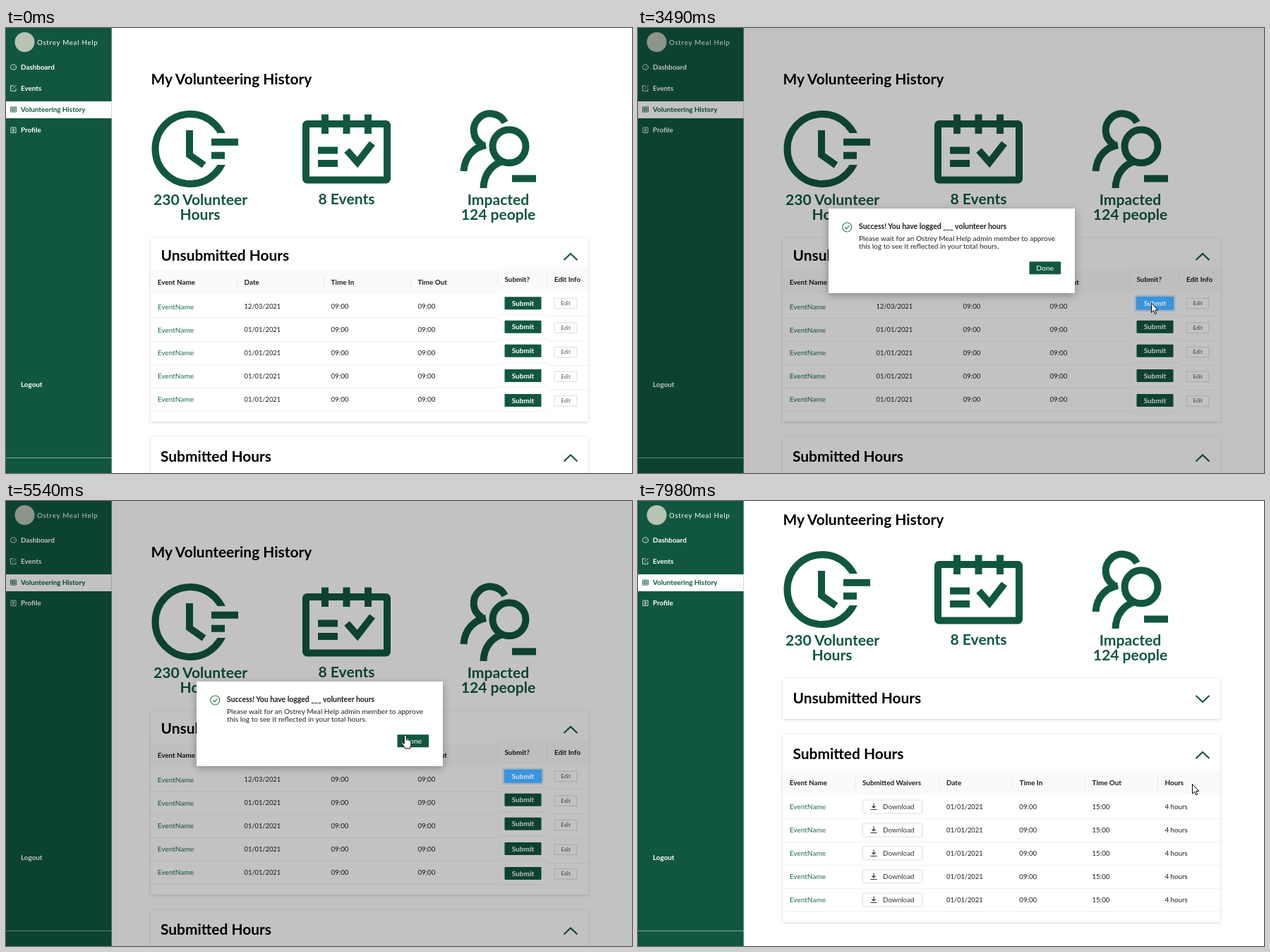
Animation, 887 px wide and 631 px high, one loop 8000 ms. Source, as an HTML page:

```html
<!DOCTYPE html>
<html lang="en">
<head>
<meta charset="utf-8">
<title>Volunteering history</title>
<style>
  html, body { margin: 0; width: 100%; height: 100%; overflow: hidden; background: #fff; }
  svg { display: block; width: 887px; height: 631px; font-family: Lato, "Open Sans", sans-serif; }
  .card { fill: #fff; filter: drop-shadow(0 1px 2px rgba(0,0,0,.17)); }
  .modal { fill: #fff; filter: drop-shadow(0 3px 6px rgba(0,0,0,.3)); }
  .line { fill: none; stroke: #115740; stroke-width: 10; }
</style>
</head>
<body>
<svg id="stage" viewBox="0 0 887 631"></svg>
<script>
const GREEN = '#115740', BLUE = '#40a9ff', LINK = '#1f6b4f', INK = '#1c1c1c';
const LOOP = 8000, SCROLL = 46;
const rows = [0, 1, 2, 3, 4];
const each = fn => rows.map(fn).join('');

// Text is placed by the middle of its capitals.
const text = (x, mid, str, { size = 9.9, fill = INK, weight = 400, anchor = 'start', gap = 0 } = {}) =>
  `<text x="${x}" y="${mid + size * .36}" font-size="${size}" fill="${fill}" font-weight="${weight}"
    text-anchor="${anchor}" letter-spacing="${gap}">${str}</text>`;
const bold = (x, mid, str, opt) => text(x, mid, str, { weight: 700, ...opt });
const head = (x, mid, str) => bold(x, mid, str, { size: 20.9, fill: '#000' });
const stat = (x, mid, str) => bold(x, mid, str, { size: 21.1, fill: GREEN, anchor: 'middle' });
const rect = (x, y, w, h, fill, more = '') =>
  `<rect x="${x}" y="${y}" width="${w}" height="${h}" fill="${fill}" ${more}/>`;
const card = (y, h) => `<rect class="card" x="205" y="${y}" width="620" height="${h}" rx="1"/>`;
const rule = (x, y, w) => rect(x, y, w, 1, '#f0f0f0');
const tick = (x, y) => rect(x, y, 1, 16, '#e8e8e8');
const chevron = (y, up) =>
  `<path d="M790.5 ${up ? y + 5 : y - 5}L800 ${up ? y - 4 : y + 4}L809.5 ${up ? y + 5 : y - 5}"
    fill="none" stroke="${GREEN}" stroke-width="2.2"/>`;
const button = (y, fill) => rect(706.5, y, 52, 18, fill, 'rx="1"') +
  bold(732.5, y + 9, 'Submit', { size: 10.1, fill: '#fff', anchor: 'middle' });
const edit = (y, edge, ink) => rect(777, y, 32, 14.5, '#fff', `stroke="${edge}"`) +
  text(793, y + 7, 'Edit', { size: 7.8, fill: ink, anchor: 'middle' });

const summary = head(205.5, 72, 'My Volunteering History') + `
  <g class="line">
    <circle cx="261" cy="171.5" r="49.5"/>
    ${rect(286, 149, 44, 45, '#fff', 'stroke="none"')}
    <path d="M260 145V180L280.5 194.5M291 161.8H329M291 180.8H310"/>
    <rect x="425" y="136" width="115" height="79.5" rx="1.5"/>
    <path d="M452 122.5V150M482.5 122.5V150M513 122.5V150M442 173.5H470M442 192H470M483 173.5L498 190.5L519 163.5"/>
    <circle cx="713" cy="167.8" r="23.5"/>
    <path d="M707 134A23.5 23.5 0 1 0 674 165"/>
    <path d="M648.5 203C650 181 664 169 680 166M676.5 227C677 206 690 193 704 189M717 213.5H751"/>
  </g>` +
  stat(275.5, 243, '230 Volunteer') + stat(275, 264.5, 'Hours') +
  stat(482.5, 242.5, '8 Events') + stat(697.5, 243, 'Impacted') + stat(697.5, 264.5, '124 people');

const openHours = card(298, 260) + head(219.5, 322, 'Unsubmitted Hours') + chevron(324, true) +
  rect(205, 344, 492, 33, '#fafafa') + rect(697, 339, 128, 35, '#fafafa') +
  ['Event Name', 'Date', 'Time In', 'Time Out'].map((s, i) =>
    bold(214.7 + i * 122.9, 360.5, s) + (i ? tick(204 + i * 123, 353) : '')).join('') +
  tick(696, 348) + tick(766, 348) + bold(706.5, 356, 'Submit?') + bold(777, 356, 'Edit Info') +
  each(i => {
    const y = 395 + i * 32.9;
    return text(214.7, y, 'EventName', { size: 10.1, fill: LINK }) +
      text(337.6, y, i ? '01/01/2021' : '12/03/2021', { size: 9.3 }) +
      text(460.5, y, '09:00', { size: 9.7 }) + text(583.4, y, '09:00', { size: 9.7 }) +
      rule(205, 411 + i * 33, 492) + rule(697, 406 + i * 34.3, 70) +
      (i < 4 ? rule(768, 408 + i * 35, 57) : '') +
      button([381.3, 414.7, 448.8, 484, 519][i], GREEN) +
      edit(383.2 + i * 34.6, '#ddd', '#555');
  }) +
  `<g id="editHover">${edit(417.8, BLUE, BLUE)}</g>
   <g id="ring">${rect(703.5, 378.5, 58, 23.5, BLUE, 'opacity=".25" rx="2"')}</g>
   <g id="submitHover">${button(381.3, BLUE)}</g>` +
  card(580, 140) + head(219, 607.5, 'Submitted Hours') + chevron(609.5, true);

const download = y => rect(318.5, y - 9.5, 84, 19, '#fff', 'stroke="#ddd" rx="1"') +
  `<path d="M334 ${y - 5}V${y + 1}M331.5 ${y - 1}L334 ${y + 1.5}L336.5 ${y - 1}M329.5 ${y + 4}H338.5"
    fill="none" stroke="#333" stroke-width="1.1"/>` + text(347, y, 'Download', { fill: '#333' });

const submitted = rect(150, 285, 737, 400, '#fff') +
  card(298, 57) + head(219.5, 325.5, 'Unsubmitted Hours') + chevron(327, false) +
  card(377, 266) + head(219.5, 404.5, 'Submitted Hours') + chevron(406, true) +
  rect(205, 429, 620, 34, '#fafafa') +
  [[214.7, 'Event Name'], [318, 'Submitted Waivers'], [437, 'Date'], [540.5, 'Time In'],
   [643.5, 'Time Out'], [746.5, 'Hours']].map(([x, s], i) =>
    bold(x, 445.7, s) + (i ? tick(x - 10.5, 438) : '')).join('') +
  each(i => {
    const y = 479.5 + i * 33;
    return text(214.7, y, 'EventName', { size: 10.1, fill: LINK }) + download(y) +
      text(437, y, '01/01/2021', { size: 9.3 }) + text(540.3, y, '09:00', { size: 9.7 }) +
      text(643.5, y, '15:00', { size: 9.7 }) + text(746.5, y, '4 hours', { size: 9.7 }) +
      rule(205, y + 16.5, 620);
  });

const item = (y, str, fill, icon) => bold(21, y, str, { fill }) +
  `<path transform="translate(6 ${y - 4.5})" d="${icon}" fill="none" stroke="${fill}" stroke-width=".8"/>`;
const sidebar = rect(0, 0, 149.7, 631, GREEN) + rect(0, 104, 149.7, 24, '#fff') +
  rect(0, 609, 149.7, 1, '#8bab9f') +
  '<circle cx="26.5" cy="20" r="14" fill="#b9c3b4"/>' +
  text(44, 20.8, 'Ostrey Meal Help', { size: 9.7, fill: '#fff', gap: .75 }) +
  item(55.3, 'Dashboard', '#fff', 'M2 8A4 4 0 1 1 7 8ZM4.5 5.5L6.5 3.5') +
  item(85.3, 'Events', '#fff', 'M5 1H.5V8.5H8V5M3.5 5.5L8.5 .5') +
  item(115.5, 'Volunteering History', GREEN, 'M.5 1H8.5V8H.5ZM.5 3.3H8.5M.5 5.6H8.5M3.2 1V8M5.8 1V8') +
  item(144.8, 'Profile', '#fff', 'M1 .8H8V8.2H1ZM3 3H6M3 4.5H6M3 6H6') +
  bold(21, 505.7, 'Logout', { fill: '#fff' });

const modal = '<rect class="modal" x="270" y="256" width="349" height="120"/>' +
  `<g fill="none" stroke="#2f7d55" stroke-width="1.2"><circle cx="296.3" cy="282.5" r="6.5"/>
   <path d="M293.3 282.5L295.6 285L299.5 280"/></g>` +
  bold(313, 281.3, 'Success! You have logged ___ volunteer hours', { size: 10.45 }) +
  text(313, 298, 'Please wait for an Ostrey Meal Help admin member to approve', { size: 10.15, fill: '#222' }) +
  text(313, 309.8, 'this log to see it reflected in your total hours.', { size: 10.15, fill: '#222' }) +
  rect(554.5, 331.3, 44.5, 18, GREEN, 'rx="1"') +
  text(576.7, 340.2, 'Done', { size: 10.3, fill: '#fff', anchor: 'middle' });

document.getElementById('stage').innerHTML = `
  <g id="page">${summary}${openHours}<g id="submitted">${submitted}</g></g>
  ${sidebar}
  <g id="popup">
    ${rect(0, 0, 887, 631, '#000', 'opacity=".24"')}
    <g opacity=".5">${button(381.3, BLUE)}</g>
    ${modal}
  </g>
  <g id="cursor" fill="#fff" stroke="#000" stroke-linejoin="round">
    <path id="arrow" d="M.5 .5V14L3.6 11.2L5.6 15.8L7.7 14.9L5.7 10.4H9.8Z"/>
    <path id="hand" transform="translate(-5 -1)" d="M4 12.5V1.8a1.5 1.5 0 0 1 3 0V7c.3-.9 2.4-.8 2.5 .3
      .6-.7 2.3-.4 2.3 .7 .8-.4 1.9 0 1.9 1.1v4c0 2-1.2 3-1.5 5.9H5.5C4.8 16.5 1.5 14 .6 11.6c-.4-1.2 1.2-1.7 2-.8z"/>
  </g>`;

const el = id => document.getElementById(id);
const ramp = (t, start, length) => Math.min(1, Math.max(0, (t - start) / length));
const ease = p => p * p * (3 - 2 * p);
const fade = (id, v) => el(id).setAttribute('opacity', v);

// Cursor path: time, x, y of its tip
const path = [
  [430, 864, 634], [1190, 826, 445], [1290, 826, 445], [1730, 787, 409], [2090, 783, 411],
  [2110, 783, 411], [2900, 724, 390], [3070, 724, 390], [3490, 727, 389.5], [3810, 767, 376],
  [3910, 767, 376], [4690, 559, 332], [4740, 559, 332], [5090, 565, 333], [5530, 565, 333],
  [6120, 788, 337], [6260, 796, 330], [6280, 796, 330], [6580, 804, 322], [7070, 804, 322],
  [7840, 801, 397], [7940, 801, 397], [7980, 785, 401]
];
const pointing = [[1540, 2260], [2430, 3150], [4480, 5620], [6260, 7200]];

function tip(t) {
  const i = path.findIndex(k => k[0] > t);
  if (i < 1) return path[i ? path.length - 1 : 0].slice(1);
  const [a, b] = [path[i - 1], path[i]];
  const p = ease(ramp(t, a[0], b[0] - a[0]));
  return [a[1] + (b[1] - a[1]) * p, a[2] + (b[2] - a[2]) * p];
}

function draw(now) {
  const t = now % LOOP;
  const closed = ramp(t, 5540, 300);
  const isHand = pointing.some(([a, b]) => t >= a && t < b);
  fade('editHover', ramp(t, 1540, 150) - ramp(t, 2150, 150));
  fade('submitHover', ramp(t, 2430, 150) - closed);
  fade('ring', ramp(t, 3080, 200) - closed);
  fade('popup', ease(ramp(t, 3080, 300)) - ease(closed));
  fade('submitted', ease(ramp(t, 7080, 300)));
  el('page').setAttribute('transform', `translate(0 ${-SCROLL * ease(ramp(t, 7420, 400))})`);
  el('cursor').setAttribute('transform', `translate(${tip(t).join(' ')})`);
  fade('arrow', isHand ? 0 : 1);
  fade('hand', isHand ? 1 : 0);
  requestAnimationFrame(draw);
}
requestAnimationFrame(draw);
</script>
</body>
</html>
```
